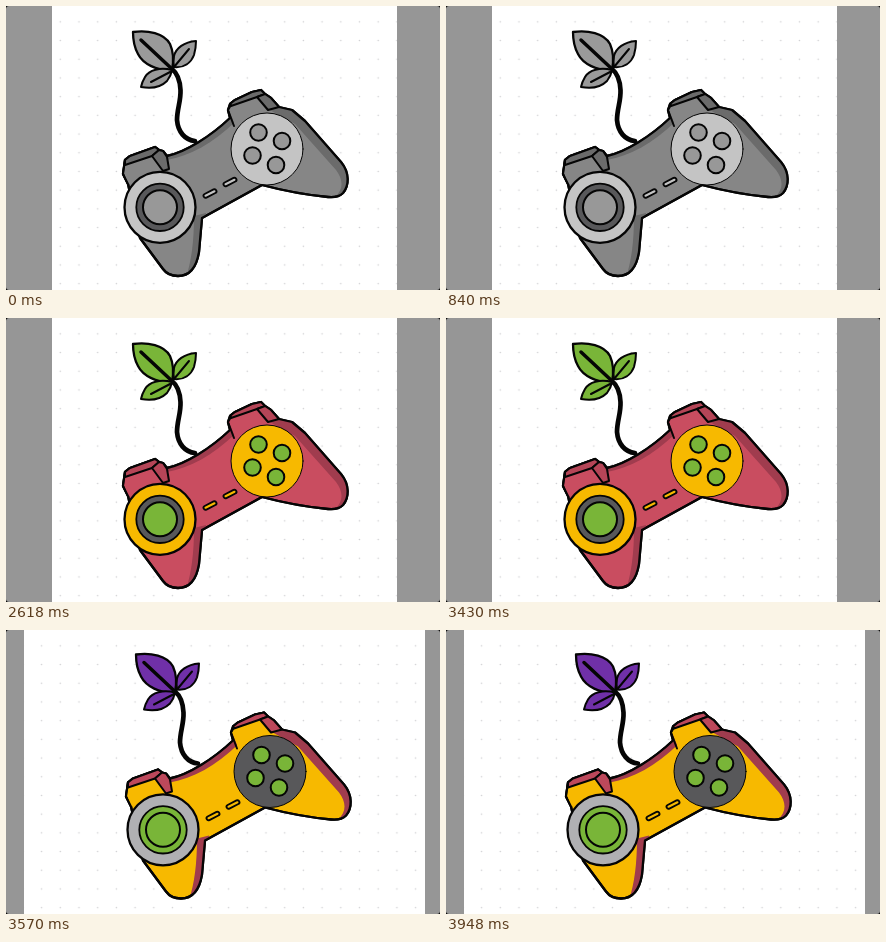
Recreate the animation shown at these times as an HTML page. Size 434 px wide and 284 px high, loop 4200 ms.

```html
<!DOCTYPE html>
<html lang="en">
<head>
<meta charset="utf-8">
<title>Growing gamepad</title>
<style>
  html, body { margin: 0; width: 100%; height: 100%; overflow: hidden; background: #000; }
  svg { display: block; width: 100%; height: 100%; }
  #pad { stroke: #050505; stroke-width: 2.3; stroke-linejoin: round; stroke-linecap: round; fill: none; }
  .leaf { fill: var(--leaf); }
  .body { fill: var(--body); }
  .shade { fill: var(--shade); stroke: none; }
  .top { fill: var(--top); }
  .front { fill: var(--body); stroke: none; }
  .dial { fill: var(--dial); }
  .ring { fill: var(--ring); }
  .button { fill: var(--button); }
  .face { fill: var(--face); }
  .dash { fill: var(--dash); }
</style>
</head>
<body>
<svg viewBox="0 0 434 284">
  <defs>
    <pattern id="dots" x="45" y="6.500" width="18.7" height="18.7" patternUnits="userSpaceOnUse">
      <circle cx="9.300" cy="9.300" r=".8" fill="#cfcfd2"/>
    </pattern>
    <path id="outline" d="M119 154 L124 150 L149 141 L153 144 L157 145 L161 150 C180 146 205 130 224 112 L222 104 L224 98
      L229 94 L246 86 L255 84 L259 88 L265 92 L273 101 L286 104 L299 115 L335 156 C344 167 343 180 337 187
      Q332 192 322 191 Q290 188 256 179 L196 212 L193 246 C190 264 182 270 172 270 Q162 270 157 263
      L134 232 L122 178 L117 168 Z"/>
    <clipPath id="inside"><use href="#outline"/></clipPath>
  </defs>
  <rect width="434" height="284" rx="3" fill="#969696"/>
  <rect class="panel" height="284" fill="#fff"/>
  <rect class="panel" height="284" fill="url(#dots)"/>
  <g id="pad">
    <path stroke-width="4.700" d="M189 135 C179 134 172 126 171 114 C171 103 175 95 174.500 84 C174 74 171 67 166 63"/>
    <path class="leaf" d="M127 26 C142 24 158 27 164 38 Q169 49 166 64 C151 65 137 58 132 48 Q127 39 127 26 Z"/>
    <path class="leaf" stroke-width="2" d="M190 35 C178 36 170 42 168 50 Q167 56 168 61 C178 62 185 57 188 49 Q190 42 190 35 Z"/>
    <path class="leaf" stroke-width="2" d="M166 64 C154 61 143 64 139 71 Q136 76 135 81 C146 83 155 81 161 75 Q165 70 166 64 Z"/>
    <path stroke-width="3.500" d="M135 34 L166 63"/>
    <path stroke-width="2" d="M168 61 L183 43 M166 65 L145 76"/>

    <use href="#outline" class="body"/>
    <g clip-path="url(#inside)">
      <path class="shade" d="M158 144 L226 105 L229 116 C207 137 184 150 161 154 Z"/>
      <path class="shade" d="M258 86 L290 101 L345 163 L345 195 L329 191 C338 183 337 173 330 164 L289 118 L262 103 Z"/>
      <path class="shade" d="M188 210 L200 207 L197 270 L180 271 Q188 248 188 210 Z"/>
    </g>
    <use href="#outline"/>

    <path class="front" d="M118 167 L119 159 L146 150 L158 166 L122 178 Z"/>
    <path class="top" stroke-width="2" d="M119 154 L124 150 L149 141 L153 144 L146 150 L119 159 Z"/>
    <path class="top" stroke-width="2" d="M146 150 L153 144 L157 145 L161 151 L163 163 L157 165 Z"/>
    <path stroke-width="2" d="M119 154 L117 168 L122 178"/>
    <path class="front" d="M223 104 L225 99 L251 91 L262 104 L229 119 Z"/>
    <path class="top" stroke-width="2" d="M224 98 L229 94 L246 86 L255 84 L259 88 L251 91 L225 100 Z"/>
    <path class="top" stroke-width="2" d="M251 91 L259 88 L265 92 L273 101 L262 104 Z"/>
    <path stroke-width="2" d="M225 99 L222 104 L228 120"/>

    <circle class="dial" cx="154" cy="201.300" r="35.500"/>
    <circle class="ring" cx="154" cy="201.300" r="23.700" stroke-width="1.800"/>
    <circle class="button" cx="154" cy="201.300" r="17" stroke-width="2"/>
    <circle class="face" cx="261" cy="143" r="36" stroke-width="1"/>
    <g class="button" stroke-width="2">
      <circle cx="252.500" cy="126.500" r="8.300"/>
      <circle cx="276" cy="135" r="8.300"/>
      <circle cx="246.500" cy="149.500" r="8.300"/>
      <circle cx="270" cy="159" r="8.300"/>
    </g>
    <g class="dash" stroke-width="1.900">
      <rect x="-7" y="-2" width="14" height="4" rx="2" transform="translate(204 187.500) rotate(-27)"/>
      <rect x="-7" y="-2" width="14" height="4" rx="2" transform="translate(224 176) rotate(-27)"/>
    </g>
  </g>
</svg>
<script>
  const LOOP = 4200;
  const red = '#c94d60', wine = '#a03c4e', yellow = '#f7b900', green = '#79b538', slate = '#58585a';

  const looks = [
    { until: 1400, left: 46, width: 345, shift: [0, 0], colors: {
      leaf: '#9a9a9a', body: '#868686', shade: '#6b6b6b', top: '#6b6b6b',
      dial: '#c4c4c4', ring: slate, button: '#989898', face: '#c4c4c4', dash: '#c4c4c4' } },
    { until: 3500, left: 46, width: 345, shift: [0, 0], colors: {
      leaf: green, body: red, shade: wine, top: '#b54557',
      dial: yellow, ring: slate, button: green, face: yellow, dash: yellow } },
    { until: LOOP, left: 18, width: 401, shift: [3, -1.5], colors: {
      leaf: '#7030a8', body: yellow, shade: wine, top: '#bd485b',
      dial: '#b0b0b3', ring: green, button: green, face: slate, dash: yellow } }
  ];

  const pad = document.getElementById('pad');
  const panels = document.querySelectorAll('.panel');
  let shown;

  function show(look) {
    for (const panel of panels) {
      panel.setAttribute('x', look.left);
      panel.setAttribute('width', look.width);
    }
    pad.setAttribute('transform', `translate(${look.shift})`);
    for (const [part, color] of Object.entries(look.colors)) pad.style.setProperty('--' + part, color);
    shown = look;
  }

  const start = performance.now();
  function tick() {
    const time = (performance.now() - start) % LOOP;
    const look = looks.find(l => time < l.until);
    if (look !== shown) show(look);
    requestAnimationFrame(tick);
  }
  tick();
</script>
</body>
</html>
```
